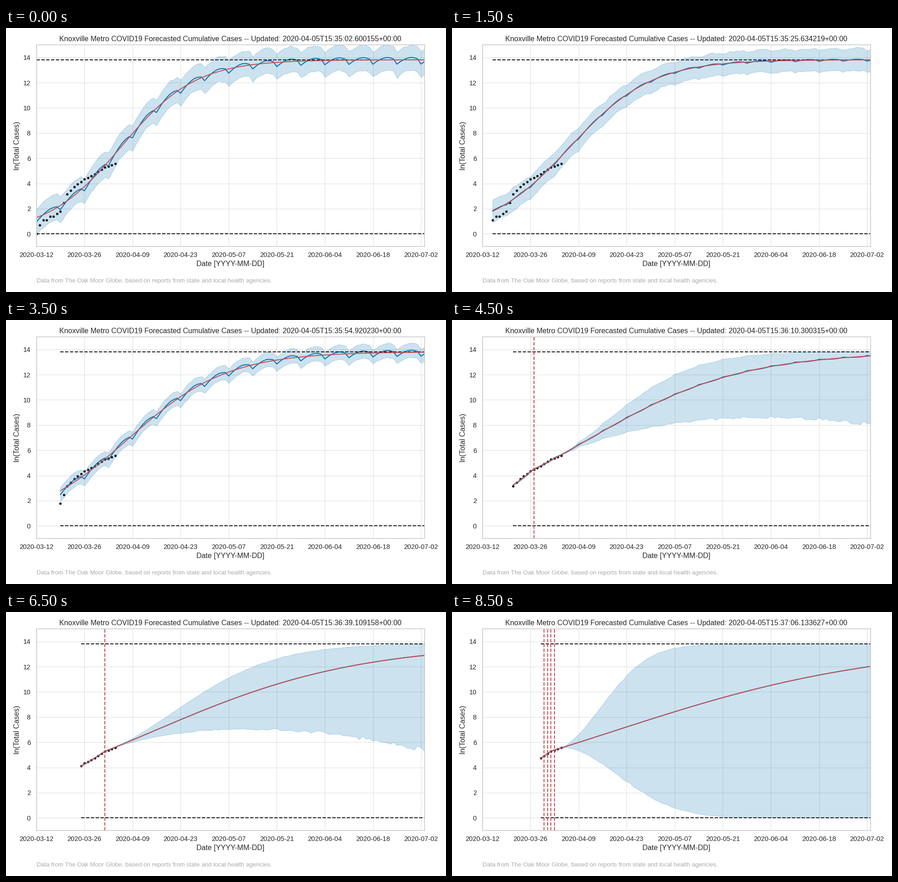
These frames come from a looping animation (966x580 px, 9000 ms). A matplotlib script:

```python
import numpy as np
import matplotlib.pyplot as plt
from matplotlib.animation import FuncAnimation

W, H, DPI = 966, 580, 96
FRAMES, STEP_MS = 18, 500
LEFT, RIGHT, TOP, BOTTOM = 66.6, 918.6, 37, 480

START = np.datetime64("2020-03-12")
LAST_SEEN, END = 23, 113
CAP = np.log(1e6)
DAYS = np.arange(END + 1)
AHEAD = np.maximum(DAYS - LAST_SEEN, 0)
BLUE, RED, BLACK, INK = "#0072B2", "#c44e52", "#1a1a1a", "#262626"

# Case counts grow exponentially between a few turning points
TURNS = [(0, 1), (2, 3), (3, 3), (7, 6), (9, 23), (11, 42), (14, 76),
         (17, 113), (20, 196), (23, 260)]
turn_days, turn_cases = np.array(TURNS).T
LOG_CASES = np.log(np.round(np.exp(
    np.interp(DAYS[:LAST_SEEN + 1], turn_days, np.log(turn_cases)))))

# Model settings by first fitted day, blended in between:
# logit level on the last seen day, slope, slope before the bend, bend day,
# interval half width, its growth, weekly swing, run time in seconds
FITS = {
    0: (-.155, .0924, .0924, 15, 1.0, 0, .54, 2.600155),
    3: (-.217, .0841, .0841, 15, .88, 0, .15, 25.634219),
    7: (-.261, .0693, .0693, 15, .57, 0, .50, 54.920230),
    9: (-.367, .0450, .0752, 15, .04, .0039, -.08, 70.300315),
    11: (-.381, .0328, .0551, 20, .02, .0046, 0, 85.712959),
    13: (-.379, .0335, .0547, 20, .02, .0036, 0, 99.109158),
    17: (-.396, .0255, .0610, 20, 0, .0171, 0, 126.133627),
}
# Trend changes: day, first and last frame that shows it
CHANGES = [(14, 10, 11), (15, 8, 12), (18, 16, 17), (19, 15, 17),
           (20, 11, 17), (21, 16, 17)]


def logistic(x):
    return CAP / (1 + np.exp(-x))


def settings(k):
    return [np.interp(k, list(FITS), col) for col in zip(*FITS.values())]


def forecast_at(k):
    """Trend, forecast, upper and lower edge for every day."""
    level, slope, before, bend, half, growth, swing, _ = settings(k)
    x = level + slope * (DAYS - LAST_SEEN)
    x = x - (before - slope) * np.maximum(bend - DAYS, 0)
    week = swing * (.37 - abs(DAYS % 7 / 4.2 - 1) ** 1.7)
    up, down = 1 + np.random.default_rng(k).normal(0, 1, (2, END + 1)) * .01
    fan = growth * AHEAD ** 1.5
    trend = logistic(x)
    return (trend, trend + week,
            logistic(x + fan * up) + week + half * up ** 4,
            logistic(x - fan * down) + week - half * down ** 4)


def title_at(k):
    sec, us = divmod(int(round(settings(k)[-1] * 1e6)), 10 ** 6)
    return ("Knoxville Metro COVID19 Forecasted Cumulative Cases -- Updated: "
            f"2020-04-05T15:{35 + sec // 60}:{sec % 60:02d}.{us:06d}+00:00")


plt.rcParams.update({
    "font.family": "Liberation Sans", "text.color": INK,
    "axes.labelcolor": INK, "xtick.color": INK, "ytick.color": INK,
    "axes.edgecolor": "0.8", "axes.linewidth": 1.25, "axes.axisbelow": True,
})
fig = plt.figure(figsize=(W / DPI, H / DPI), dpi=DPI, facecolor="white")
ax = fig.add_axes([LEFT / W, 1 - BOTTOM / H, (RIGHT - LEFT) / W,
                   (BOTTOM - TOP) / H])
ax.set_xlim(0, END)
ax.set_ylim(-1, 15)
ticks = range(0, END, 14)
ax.set_xticks(ticks, [str(START + d) for d in ticks])
ax.set_yticks(range(0, 15, 2))
ax.tick_params(length=6, bottom=False, left=False, labelsize=11)
ax.tick_params(axis="x", pad=2.7)
ax.grid(True, c="gray", ls="-", lw=1, alpha=.2)
ax.set_xlabel("Date [YYYY-MM-DD]", fontsize=12)
ax.set_ylabel("ln(Total Cases)", fontsize=12)
title = ax.set_title("", fontsize=12)
fig.text(LEFT / W, 20.5 / H, "Data from The Oak Moor Globe, based on reports "
         "from state and local health agencies.", fontsize=10, color="#aaaaaa")


def line(color, style="-"):
    return ax.plot([], [], style, c=color, lw=1.5, ms=6)[0]


dots = line(BLACK, ".")
forecast = line(BLUE)
limits = {0: line(BLACK, "--"), CAP: line(BLACK, "--")}
band = ax.fill_between(DAYS, 0 * DAYS, 1, color=BLUE, alpha=.2, lw=1)
trend_line = line(RED)
marks = [ax.axvline(day, c=RED, ls="--", lw=1.5) for day, *_ in CHANGES]


def update(k):
    days = DAYS[k:]
    trend, yhat, hi, lo = (curve[k:] for curve in forecast_at(k))
    title.set_text(title_at(k))
    dots.set_data(DAYS[k:LAST_SEEN + 1], LOG_CASES[k:])
    forecast.set_data(days, yhat)
    trend_line.set_data(days, trend)
    for y, limit in limits.items():
        limit.set_data([k, END], [y, y])
    band.set_verts([np.column_stack([np.r_[days, days[::-1]],
                                     np.r_[hi, lo[::-1]]])])
    for mark, (_, first, last) in zip(marks, CHANGES):
        mark.set_visible(first <= k <= last)
    return []


anim = FuncAnimation(fig, update, frames=FRAMES, interval=STEP_MS,
                     init_func=lambda: update(0), repeat=True, repeat_delay=0)
plt.show()
```
